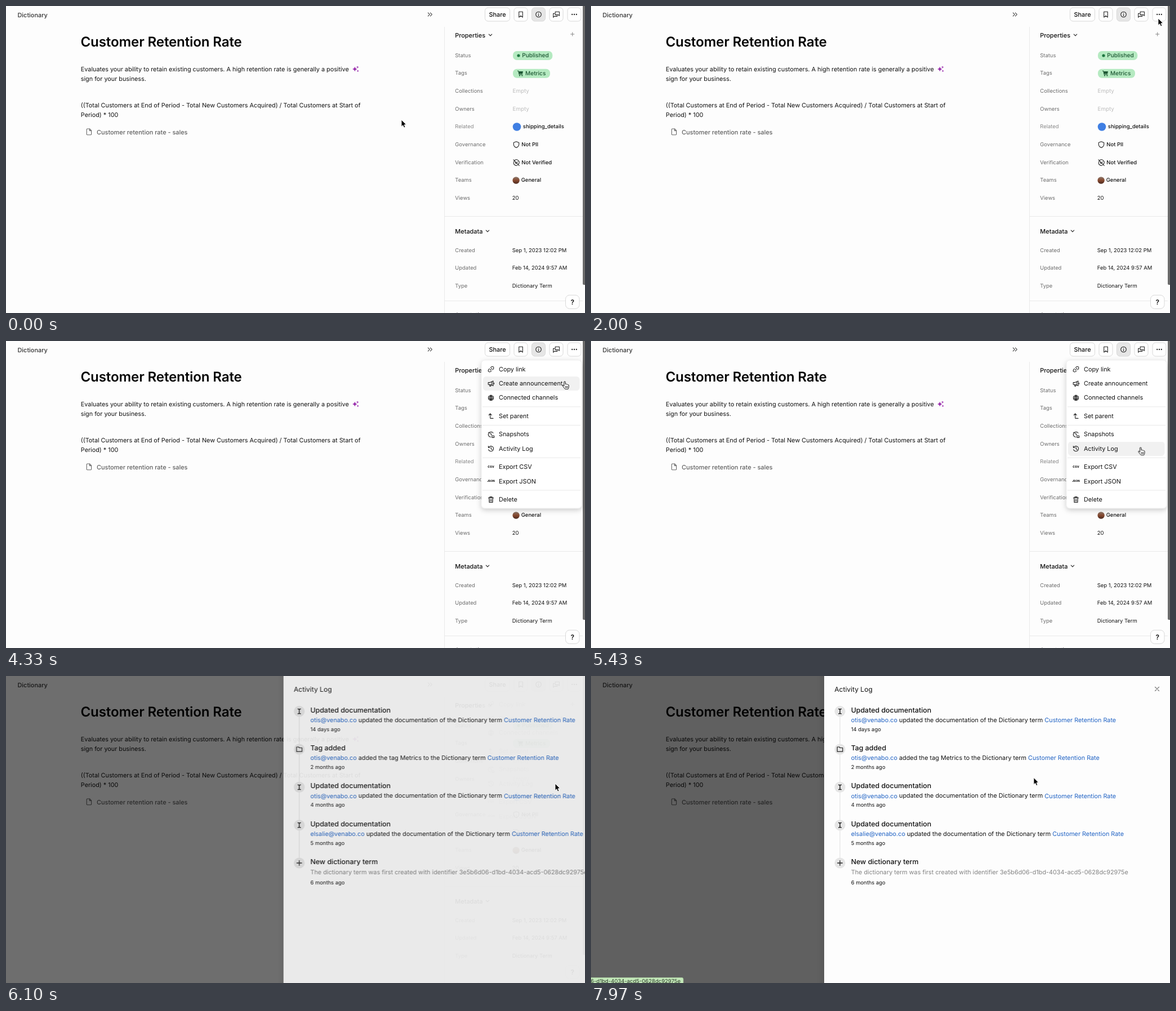
Recreate the animation shown at these times as an HTML page. Size 1028 px wide and 545 px high, loop 8000 ms.

```html
<!DOCTYPE html>
<html lang="en">
<head>
<meta charset="utf-8">
<title>Activity log</title>
<style>
html, body { margin: 0; width: 100%; height: 100%; overflow: hidden; background: #fdfdfd; }
svg { display: block; width: 100vw; height: 100vh; }
text {
  font: 400 10.82px Inter, "Liberation Sans", sans-serif;
  fill: #111; dominant-baseline: central; text-rendering: geometricPrecision; white-space: pre;
}
.mid { font-size: 10.9px; font-weight: 500; }
.title { font-size: 24.1px; font-weight: 600; letter-spacing: -.14px; fill: #050505; }
.label text { font-size: 9.43px; fill: #6c6c6c; }
.value text { font-size: 9.46px; }
.value .pill { font-size: 10.1px; font-weight: 500; fill: #1d5733; }
.value .empty { font-size: 9.8px; fill: #bdbdbd; }
.icon { fill: none; stroke: #222; stroke-width: 1.1; stroke-linecap: round; stroke-linejoin: round; }
.button rect { fill: #fff; stroke: #d8d8d8; }
.line { stroke: #e9e9e9; }
.tiny { font-size: 5.2px; font-weight: 800; }
.head { font-size: 12.36px; font-weight: 500; }
.ago { font-size: 9.43px; }
.link { fill: #1f62c4; }

.cursor, .arrow, .hand, .menu, .hover, .dots, .shade, .drawer, .slide, .status {
  animation: 8s linear infinite;
}
.cursor { animation-name: move; animation-timing-function: ease-in-out; }
@keyframes move {
  0%, .3% { transform: translate(702px, 202px); }
  7.9%, 10% { transform: translate(962px, 62px); }
  20% { transform: translate(991px, 31px); }
  25% { transform: translate(1007px, 22px); }
  29%, 44.1% { transform: translate(1009px, 14px); }
  54.1%, 54.5% { transform: translate(992px, 72px); }
  64.6%, 65% { transform: translate(979px, 181px); }
  69.1%, 84.1% { transform: translate(975px, 191px); }
  89.1% { transform: translate(841px, 92px); }
  93.1% { transform: translate(812px, 142px); }
  96.3% { transform: translate(796px, 150px); }
  99.6%, 100% { transform: translate(786px, 180.5px); }
}
.arrow { animation-name: arrow; animation-timing-function: step-end; }
@keyframes arrow {
  0%, 75.7%, 96.9% { opacity: 1; }
  25.6%, 92.5% { opacity: 0; }
  100% { opacity: 1; }
}
.hand { animation-name: hand; animation-timing-function: step-end; }
@keyframes hand {
  0%, 75.7%, 96.9% { opacity: 0; }
  25.6%, 92.5% { opacity: 1; }
  100% { opacity: 0; }
}
.dots { animation-name: dots; animation-timing-function: step-end; }
@keyframes dots {
  0%, 31.25%, 100% { fill: #fff; }
  25.6% { fill: #f1f1f1; }
}
.menu { animation-name: menu; }
@keyframes menu {
  0%, 31.25%, 76.9%, 100% { opacity: 0; }
  33.1%, 74.75% { opacity: 1; }
}
.hover { animation-name: hover; animation-timing-function: step-end; }
@keyframes hover {
  0%, 100% { opacity: 0; transform: translateY(0); }
  48.6% { opacity: 1; transform: translateY(-25.5px); }
  50.9% { opacity: 1; transform: translateY(0); }
  57.3% { opacity: 1; transform: translateY(25.3px); }
  59% { opacity: 0; transform: translateY(25.3px); }
  59.3% { opacity: 1; transform: translateY(57.7px); }
  60.6% { opacity: 0; transform: translateY(57.7px); }
  60.9% { opacity: 1; transform: translateY(90.2px); }
  63.4% { opacity: 1; transform: translateY(115.5px); }
}
.shade { animation-name: shade; }
@keyframes shade {
  0% { opacity: 0; }
  74.74% { opacity: 0; animation-timing-function: ease; }
  77.1%, 100% { opacity: .62; }
}
.drawer { animation-name: fade; }
@keyframes fade {
  0% { opacity: 0; }
  74.74% { opacity: 0; animation-timing-function: ease; }
  77.36%, 100% { opacity: 1; }
}
.slide { animation-name: slide; }
@keyframes slide {
  0% { transform: translateX(614px); }
  74.74% { transform: translateX(614px); animation-timing-function: ease; }
  77.36%, 100% { transform: translateX(0); }
}
.status { animation-name: status; }
@keyframes status {
  0%, 92.8% { opacity: 0; }
  93.8%, 99.99% { opacity: 1; }
  100% { opacity: 0; }
}
</style>
</head>
<body>
<svg viewBox="0 0 1028 545">
  <defs>
    <linearGradient id="brown" x2="0" y2="1">
      <stop offset="0" stop-color="#8b776b"/>
      <stop offset=".5" stop-color="#87492f"/>
      <stop offset="1" stop-color="#4a2a20"/>
    </linearGradient>
    <filter id="soft" x="-20%" y="-20%" width="140%" height="140%">
      <feDropShadow dx="0" dy="3" stdDeviation="5" flood-opacity=".2"/>
    </filter>
    <filter id="edge" x="-5%" y="-5%" width="110%" height="110%">
      <feDropShadow dx="0" dy="0" stdDeviation="6" flood-opacity=".18"/>
    </filter>
    <path id="down" class="icon" d="M-2.7-1.3 0 1.4 2.7-1.3"/>
    <g id="beam">
      <circle r="9.6" fill="#e6e6e6"/>
      <path class="icon" style="stroke-width:1.5" d="M-2.3-4.2Q0-4.2 0-3V3Q0 4.2-2.3 4.2M2.3-4.2Q0-4.2 0-3V3Q0 4.2 2.3 4.2"/>
    </g>
  </defs>
  <rect width="1028" height="545" fill="#fdfdfd"/>

  <!-- document -->
  <text class="mid" x="20.5" y="15.5" style="fill:#333">Dictionary</text>
  <path class="icon" style="stroke:#555" d="M749.3 12 752.3 15 749.3 18M753.3 12 756.3 15 753.3 18"/>
  <text class="title" x="132.5" y="63.5">Customer Retention Rate</text>
  <text x="132.8" y="112">Evaluates your ability to retain existing customers. A high retention rate is generally a positive</text>
  <text x="132.8" y="129.3">sign for your business.</text>
  <g transform="translate(620.5 112)" fill="#9a2fad">
    <path d="M-1.2-4.6Q-.5-.7 3.4 0Q-.5.7-1.2 4.6Q-1.9.7-5.8 0Q-1.9-.7-1.2-4.6Z"/>
    <path d="M3.6-5.2V-1.6M1.8-3.4H5.4M4.2 1.8V4.8M2.7 3.3H5.7" stroke="#9a2fad"/>
  </g>
  <text x="132.8" y="176">((Total Customers at End of Period - Total New Customers Acquired) / Total Customers at Start of</text>
  <text x="132.8" y="193.5">Period) * 100</text>
  <path class="icon" style="stroke:#666" d="M148.5 218H144.4Q143.2 218 143.2 219.2V227.6Q143.2 228.8 144.4 228.8H150.4Q151.6 228.8 151.6 227.6V221.2ZM148.3 218.2V221.4H151.4"/>
  <text class="mid" x="161" y="223.8" style="fill:#606060">Customer retention rate - sales</text>

  <!-- toolbar -->
  <g class="button">
    <rect x="850.5" y="3" width="44" height="24" rx="5.5"/>
    <rect x="902" y="3" width="24" height="24" rx="5.5"/>
    <rect x="933.5" y="3" width="24" height="24" rx="5.5" style="fill:#e6e6e6"/>
    <rect x="965" y="3" width="24" height="24" rx="5.5"/>
    <rect class="dots" x="997" y="3" width="24" height="24" rx="5.5"/>
  </g>
  <text class="mid" x="857.5" y="15.3">Share</text>
  <g class="icon">
    <path d="M910.7 10.3H917.3V20L914 17.4 910.7 20Z"/>
    <circle cx="945.5" cy="15" r="4.8"/>
    <path d="M945.5 14.8V17.4M945.5 12.6V12.7"/>
    <path d="M975.2 10.2H982.4V17.3L980.4 15.6H975.2ZM973.6 13.4H971.7V20.2L973.6 18.4H978.6V17"/>
  </g>
  <g fill="#222"><circle cx="1005.2" cy="15" r="1.15"/><circle cx="1009" cy="15" r="1.15"/><circle cx="1012.8" cy="15" r="1.15"/></g>

  <!-- properties -->
  <path class="line" d="M778.5 37V545M779 373.5H1024M779 523.5H1024"/>
  <text class="mid" x="797.3" y="51.5">Properties</text>
  <use href="#down" x="860" y="51.5"/>
  <path d="M1002.2 50H1009.2M1005.7 46.5V53.5" stroke="#888"/>
  <g class="label">
    <text x="797.3" y="88">Status</text>
    <text x="797.3" y="119.7">Tags</text>
    <text x="797.3" y="151.3">Collections</text>
    <text x="797.3" y="183">Owners</text>
    <text x="797.3" y="214.7" style="fill:#8a8a8a">Related</text>
    <text x="797.3" y="246.3">Governance</text>
    <text x="797.3" y="278">Verification</text>
    <text x="797.3" y="309.7">Teams</text>
    <text x="797.3" y="341.3">Views</text>
    <text x="797.3" y="434">Created</text>
    <text x="797.3" y="465.7">Updated</text>
    <text x="797.3" y="497.3">Type</text>
  </g>
  <g fill="#b5eac1">
    <rect x="900" y="80" width="70.3" height="16" rx="7"/>
    <rect x="900" y="111.7" width="66" height="16" rx="7"/>
  </g>
  <circle cx="910" cy="88" r="2.6" fill="#1e7740"/>
  <g transform="translate(913 119.5)" fill="#1d5733">
    <path d="M-5-4.3H-3.4L-1.8 2.2H4.3" fill="none" stroke="#1d5733" stroke-width="1.1"/>
    <path d="M-2.9-3.4H5L4 1H-1.9Z"/>
    <circle cx="-1" cy="4" r="1.1"/><circle cx="3.4" cy="4" r="1.1"/>
  </g>
  <circle cx="907" cy="214.5" r="7.3" fill="#3f7fe3"/>
  <path class="icon" d="M906 240.8 910.7 242.5V246Q910.4 249.6 906 251.6Q901.6 249.6 901.3 246V242.5Z"/>
  <path class="icon" d="M902.3 275.3Q903.2 272.8 906 272.5Q908.4 272.8 909.4 274.3Q911.6 276 911.2 278.4Q910.8 280 909.6 281M908.2 282.4Q906 284 904 282.5Q901.6 281.6 901.2 279.4Q900.7 277.6 902.3 275.3M901 272.8 911.2 283.4M904 278 905.6 279.7 906.4 279M907.4 277.6 908.2 276.7"/>
  <circle cx="905.6" cy="309.5" r="6.2" fill="url(#brown)"/>
  <g class="value">
    <text class="pill" x="916.2" y="88">Published</text>
    <text class="pill" x="922" y="119.7">Metrics</text>
    <text class="empty" x="899.5" y="151.3">Empty</text>
    <text class="empty" x="899.5" y="183">Empty</text>
    <text class="mid" x="917.8" y="214.7">shipping_details</text>
    <text class="mid" x="915.3" y="246.3">Not PII</text>
    <text class="mid" x="915.3" y="278">Not Verified</text>
    <text class="mid" x="914.8" y="309.7">General</text>
    <text x="898.8" y="341.3">20</text>
    <text x="898.8" y="434">Sep 1, 2023 12:02 PM</text>
    <text x="898.8" y="465.7">Feb 14, 2024 9:57 AM</text>
    <text x="898.8" y="497.3">Dictionary Term</text>
  </g>
  <text class="mid" x="797.3" y="399.5">Metadata</text>
  <use href="#down" x="855" y="399.5"/>
  <text x="797.3" y="548" style="fill:#888">Annotations</text>
  <path d="M1024 0H1028V495H1026Q1024 495 1024 493Z" fill="#6b6b6b"/>
  <rect x="993.5" y="513.3" width="24.5" height="24" rx="7" fill="#fff" stroke="#d8d8d8"/>
  <text x="1005.8" y="525.4" text-anchor="middle" style="font-weight:600;font-size:12px">?</text>

  <!-- menu -->
  <g class="menu">
    <rect x="844" y="34" width="178" height="263" rx="6" fill="#fff" stroke="#e2e2e2" stroke-width=".6" filter="url(#soft)"/>
    <rect class="hover" x="847" y="63" width="171.5" height="25" rx="5.5" fill="#f1f1f1"/>
    <path class="line" d="M846 116.8H1020M846 149.5H1020M846 207.3H1020M846 265H1020"/>
    <text x="875" y="50">Copy link</text>
    <text x="875" y="75.5">Create announcement</text>
    <text x="875" y="100.8">Connected channels</text>
    <text x="875" y="133.3">Set parent</text>
    <text x="875" y="165.9">Snapshots</text>
    <text x="875" y="191.2">Activity Log</text>
    <text x="875" y="223.7">Export CSV</text>
    <text x="875" y="249">Export JSON</text>
    <text x="875" y="281.5">Delete</text>
    <g class="icon">
      <path d="M859.6 51.6 862.6 48.6M860.4 47.4 862 45.8Q863.8 44.6 865.3 46Q866.7 47.6 865.4 49.4L863.8 51M861.8 52.8 860.2 54.4Q858.4 55.6 856.9 54.2Q855.5 52.6 856.8 50.8L858.4 49.2"/>
      <path d="M856.2 73.6H859.6L865 71V79.6L859.6 77.2H856.2ZM858 77.4 859 80.2H860.8L860.2 77.6M862.6 72.4V78.2M866.5 74.4V76.4"/>
      <circle cx="861" cy="100.8" r="4.6"/>
      <path d="M856.5 99.2H865.5M856.5 102.6H865.5M861 96.4V105.2M861 96.2Q856.7 100.8 861 105.4Q865.3 100.8 861 96.2"/>
      <path d="M857.2 131.6 859.7 129 862.2 131.6M859.7 129.4V136.4Q859.7 137.4 860.7 137.4H865"/>
      <path d="M864.9 163.3A4.7 4.7 0 1 0 860.4 170.6M861 163V166L862.6 166.8M856.8 162.2 859.2 163.6M862.8 168.2H866.6V171.4H862.8Z"/>
      <path d="M857.2 188.6A4.6 4.6 0 1 1 856.7 192.8M856.4 186.6V189.2H859M861.2 188.6V191.6L863.3 192.8"/>
      <path d="M856.6 278.4H865.4M859 278.2V276.6H863V278.2M857.6 278.6 858 286.4H864L864.4 278.6M859.8 280.8V284.2M862.2 280.8V284.2"/>
    </g>
    <text class="tiny" x="861" y="223.7" text-anchor="middle">CSV</text>
    <text class="tiny" x="861" y="249" text-anchor="middle" style="font-size:4.9px">JSON</text>
  </g>

  <!-- activity drawer -->
  <rect class="shade" width="1028" height="545"/>
  <g class="drawer"><g class="slide">
    <rect x="414" y="-20" width="640" height="600" fill="#fdfdfd" filter="url(#edge)"/>
    <text x="432.3" y="23.5" style="font-size:12.06px">Activity Log</text>
    <path class="icon" style="stroke:#777" d="M1001.5 19.5 1008.5 26.5M1008.5 19.5 1001.5 26.5"/>
    <path d="M442 62V332" stroke="#dedede"/>
    <use href="#beam" x="442" y="62.7"/>
    <use href="#beam" x="442" y="197.4"/>
    <use href="#beam" x="442" y="264.8"/>
    <circle cx="442" cy="130" r="9.6" fill="#e6e6e6"/>
    <path class="icon" style="stroke-width:1.2" d="M437.2 126H440.8L442.2 127.5H446.8V134.2H437.2Z"/>
    <circle cx="442" cy="332" r="9.6" fill="#e6e6e6"/>
    <path class="icon" style="stroke-width:1.3" d="M437.7 332H446.3M442 327.7V336.3"/>

    <text class="head" x="461.7" y="60">Updated documentation</text>
    <text x="461.7" y="78"><tspan class="link">otis@venabo.co</tspan> updated the documentation of the Dictionary term <tspan class="link">Customer Retention Rate</tspan></text>
    <text class="ago" x="461.7" y="95.2">14 days ago</text>

    <text class="head" x="461.7" y="127.3">Tag added</text>
    <text x="461.7" y="145.3"><tspan class="link">otis@venabo.co</tspan> added the tag Metrics to the Dictionary term <tspan class="link">Customer Retention Rate</tspan></text>
    <text class="ago" x="461.7" y="162.5">2 months ago</text>

    <text class="head" x="461.7" y="194.7">Updated documentation</text>
    <text x="461.7" y="212.7"><tspan class="link">otis@venabo.co</tspan> updated the documentation of the Dictionary term <tspan class="link">Customer Retention Rate</tspan></text>
    <text class="ago" x="461.7" y="229.8">4 months ago</text>

    <text class="head" x="461.7" y="262">Updated documentation</text>
    <text x="461.7" y="280"><tspan class="link">elsalie@venabo.co</tspan> updated the documentation of the Dictionary term <tspan class="link">Customer Retention Rate</tspan></text>
    <text class="ago" x="461.7" y="297.2">5 months ago</text>

    <text class="head" x="461.7" y="329.3">New dictionary term</text>
    <text x="461.7" y="348.3" style="fill:#828282">The dictionary term was first created with identifier 3e5b6d06-d1bd-4034-acd5-0628dc92975e</text>
    <text class="ago" x="461.7" y="367">6 months ago</text>
  </g></g>

  <!-- link address -->
  <g class="status">
    <rect x="-10" y="535.3" width="174" height="20" rx="3" fill="#c3e8b9" stroke="#8fae88" stroke-width=".6"/>
    <text x="159" y="542.8" text-anchor="end" style="font-size:9.5px;fill:#2c3a2a">6-d1bd-4034-acd5-0628dc92975e</text>
  </g>

  <g class="cursor" stroke="#fff" stroke-width=".9" stroke-linejoin="round">
    <path class="arrow" d="M0 0V12.2L2.8 9.7 4.7 14.1 6.9 13.1 5 8.9 8.7 8.6Z"/>
    <path class="hand" fill="#fff" stroke="#111" stroke-width="1" d="M-1.2 8.2V.9Q-1.1-.2 0-.2Q1.1-.2 1.2.9V4.6Q2.4 3.6 3.4 5Q4.8 4.2 5.4 5.6Q7.2 5.2 7.2 7V9.4Q7 11.4 6 13.2H.6Q-1.2 11-3.6 8.2Q-4.6 6.6-3.2 6.2Q-2.2 6.2-1.2 8.2ZM1.5 8.4V11M3.3 8.4V11M5 8.4V11"/>
  </g>
</svg>
</body>
</html>
```
